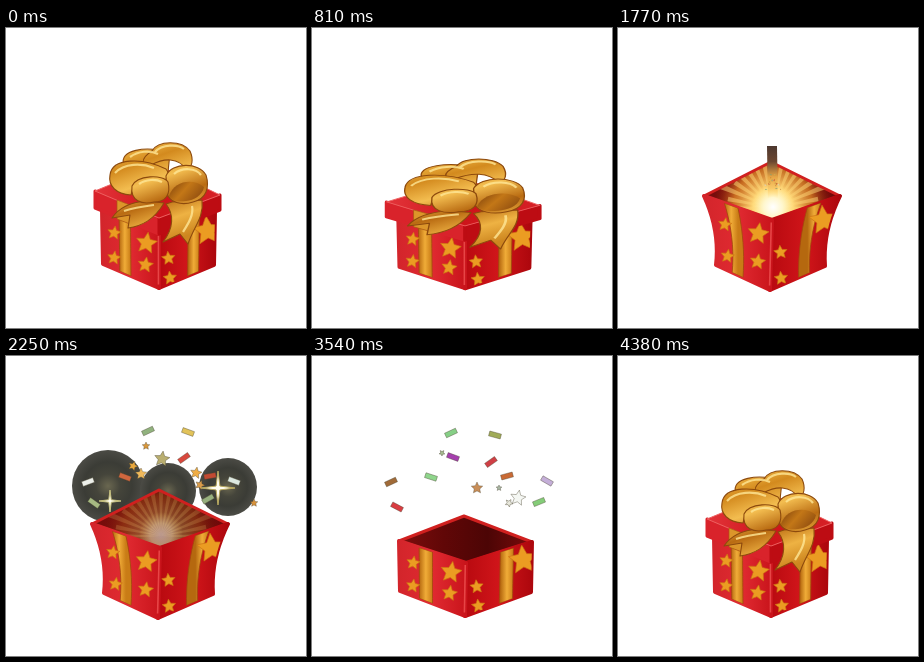
Recreate the animation shown at these times as an HTML page with a canvas. Size 300 by 300 pixels, loop 4470 ms.

```html
<!DOCTYPE html>
<html>
<head>
<meta charset="utf-8">
<style>
html, body { margin: 0; width: 100%; height: 100%; overflow: hidden; background: #fff; }
canvas { display: block; width: 300px; height: 300px; }
</style>
</head>
<body>
<canvas id="stage" width="300" height="300"></canvas>
<script>
const c = document.getElementById('stage').getContext('2d');
const LOOP = 4470, STEP = 30, LAST = 4380;
const BASE = [153, 262], LIGHT = [155, 180];

// Corners: rim left, back, right, front; then bottom left, front, right
const CLOSED = [[96, 181], [152, 150], [209, 184], [153, 206], [97, 236], [153, 260], [208, 237]];
const OPEN = [[86, 168], [153, 134], [222, 168], [154, 192], [98, 237], [152, 262], [207, 238]];
const EMPTY = [[87, 185], [152, 160], [220, 186], [154, 207], [88, 235], [153, 260], [219, 236]];

// Face decoration: side (0 left, 1 right), u, v, radius
const STARS = [[0, .21, .34, 7], [0, .78, .27, 11], [0, .2, .8, 7], [0, .76, .68, 8], [1, .17, .52, 7], [1, .2, .9, 7], [1, .87, .3, 15]];

// Confetti: x, y, angle, colour, kind (undefined = strip)
const BRIGHT = [
  [142, 75, -25, '#91b27e'], [182, 76, 20, '#e2c35a'], [82, 126, -20, '#edf0ea'], [178, 102, -35, '#d8483e'],
  [119, 121, 20, '#cf663e'], [88, 147, 35, '#a6b982'], [228, 125, 20, '#dce8e0'], [204, 120, -10, '#c24a32'],
  [202, 143, -30, '#97b07e'], [140, 90, 0, '#d9973a', 4], [156, 103, 8, '#b9ae70', 8], [127, 110, 20, '#e8a83f', 5],
  [135, 118, 0, '#f0b95b', 6], [190, 117, 10, '#efad45', 6], [248, 147, 0, '#d9923a', 4], [194, 129, 20, '#d99b4a', 5]
];
const SOFT = [
  [139, 77, -25, '#86cf86'], [183, 79, 15, '#a0ab58'], [141, 101, 20, '#a53fae'], [179, 106, -35, '#cf3f45'],
  [119, 121, 18, '#8fd58c'], [79, 126, -25, '#a06a38'], [85, 151, 28, '#d93d42'], [227, 146, -22, '#84cc78'],
  [235, 125, 30, '#c4aed8'], [195, 120, -15, '#c96a35'], [130, 97, -35, '#a6bd90', 3], [187, 132, 0, '#a9b7a4', 3],
  [165, 132, 0, '#c98e58', 6], [206, 142, 10, '#f5f7f3', 8], [197, 147, 30, '#e8e8dc', 4]
];
const DIM = [
  [175, 113, 25, '#4d4452'], [231, 141, 30, '#dda04e'], [226, 164, -20, '#dd3340'], [193, 131, -20, '#b5a878'],
  [87, 152, -20, '#a88768'], [172, 131, -40, '#34323a'], [208, 136, -30, '#494044']
];
// start, time until the listed places, gravity, pieces
const BURSTS = [[1170, 400, 2.6, SOFT], [1740, 510, 2.6, BRIGHT], [2300, 580, 6.2, DIM], [2850, 690, 2.6, SOFT]];

const BOW = [
  'M166 174L196 172C198 190 188 198 182 216L174 206L157 214C168 200 168 186 160 176Z',
  'M140 173C128 174 114 178 106 190L124 187L122 200C136 198 148 192 158 175Z',
  'M118 137C112 122 140 117 164 125L162 144C142 134 130 139 118 137Z',
  'M146 123C152 112 176 112 184 123C188 132 186 139 181 142C172 129 158 130 145 137C136 140 133 131 146 123Z',
  'M104 147C106 130 136 129 160 141C165 147 160 153 156 153C140 147 127 153 125 167C110 166 102 158 104 147Z',
  'M160 148C166 134 193 134 200 147C204 160 200 171 187 174C175 178 164 174 161 166Z',
  'M126 158C131 147 157 146 162 154C165 166 160 174 148 174C136 177 124 173 126 158Z'
].map(d => new Path2D(d));
const BOW_SHADE = new Path2D('M163 168C168 152 188 150 198 159C196 168 188 172 180 173C172 174 166 173 163 168Z');
const BOW_SHINE = new Path2D('M109 145C118 135 136 135 148 140M133 156C140 151 150 151 156 154M149 124C156 116 172 116 178 121M168 146C176 139 190 140 195 147M124 129C132 123 144 122 152 126M186 178C188 187 182 196 177 204M118 183C130 179 140 178 148 177');

const clamp = x => Math.max(0, Math.min(1, x));
const lerp = (a, b, k) => a + (b - a) * k;
const mix = (a, b, k) => [lerp(a[0], b[0], k), lerp(a[1], b[1], k)];
const mixPose = (a, b, k) => a.map((p, i) => mix(p, b[i], k));

function key(t, frames) {
  if (t <= frames[0][0]) return frames[0][1];
  for (let i = 1; i < frames.length; i++) {
    const [t0, a] = frames[i - 1], [t1, b] = frames[i];
    if (t <= t1) {
      const k = (t - t0) / (t1 - t0);
      return lerp(a, b, k * k * (3 - 2 * k));
    }
  }
  return frames[frames.length - 1][1];
}

function trace(points) {
  c.beginPath();
  points.forEach(p => c.lineTo(p[0], p[1]));
  c.closePath();
}

function paint(fill, stroke, width = 1) {
  c.fillStyle = fill;
  c.fill();
  if (stroke) {
    c.strokeStyle = stroke;
    c.lineWidth = width;
    c.stroke();
  }
}

function linear(x0, y0, x1, y1, colors) {
  const g = c.createLinearGradient(x0, y0, x1, y1);
  colors.forEach((col, i) => g.addColorStop(i / (colors.length - 1), col));
  return g;
}

function radial(x, y, r, colors) {
  const g = c.createRadialGradient(x, y, 0, x, y, r);
  colors.forEach((col, i) => g.addColorStop(i / (colors.length - 1), col));
  return g;
}

function star(x, y, r, angle, tips = 5, inner = .48) {
  const points = [];
  for (let i = 0; i < tips * 2; i++) {
    const a = angle - Math.PI / 2 + i * Math.PI / tips, d = i % 2 ? r * inner : r;
    points.push([x + d * Math.cos(a), y + d * Math.sin(a)]);
  }
  trace(points);
}

function face(pose, side, flare) {
  const rim = side ? [pose[3], pose[2]] : [pose[0], pose[3]];
  const low = side ? [pose[5], pose[6]] : [pose[4], pose[5]];
  const at = (u, v) => {
    const p = mix(mix(...rim, u), mix(...low, u), v);
    const outer = side ? -u : 1 - u;
    return [p[0] + outer * flare * 20 * v * (1 - v), p[1]];
  };
  const strip = (u0, u1) => {
    const down = [], up = [];
    for (let v = 0; v <= 1.01; v += .1) {
      down.push(at(u0, v));
      up.unshift(at(u1, v));
    }
    trace(down.concat(up));
  };
  const red = side
    ? linear(rim[0][0], 0, rim[1][0], 0, ['#b90a10', '#d0151a', '#ad070d'])
    : linear(rim[0][0], 0, rim[1][0], 0, ['#d3252b', '#e02a31', '#c9141b']);
  strip(0, 1);
  paint(red, red, 4);
  c.save();
  c.clip();
  const [u0, u1] = side ? [.52, .72] : [.3, .5];
  strip(u0, u1);
  paint(linear(at(u0, 0)[0], 0, at(u1, 0)[0], 0, ['#b5680f', '#f0ac38', '#c97c16']), '#a1480d', .8);
  STARS.filter(s => s[0] === side).forEach(([, u, v, r]) => {
    const [x, y] = at(u, v);
    star(x, y, r, side ? -.1 : .15);
    paint('#eb9c22', '#cf7414', .7);
  });
  c.restore();
  if (!side) {
    c.beginPath();
    for (let v = .04; v < .96; v += .1) c.lineTo(...at(.99, v));
    c.strokeStyle = 'rgba(255,110,105,.55)';
    c.lineWidth = 1.6;
    c.stroke();
  }
}

function lid() {
  const L = [89, 163], B = [152, 137], R = [214, 167], F = [153, 190];
  const low = (p, d) => [p[0], p[1] + d];
  trace([L, F, low(F, 16), low(L, 17)]);
  paint('#d9232b', '#d9232b', 3);
  trace([F, R, low(R, 15), low(F, 16)]);
  paint('#bd0c13', '#bd0c13', 3);
  trace([L, B, R, F]);
  paint(linear(89, 0, 214, 0, ['#e3343a', '#cd141a', '#d62026']), '#ee6060', 1);
  trace([[111, 172], [124, 177], [124, 196], [111, 191]]);
  paint('#dc962a', '#a95b11', .7);
  trace([[181, 180], [193, 175], [193, 192], [181, 197]]);
  paint('#d08a20', '#a95b11', .7);
  const gold = linear(125, 115, 160, 215, ['#f4bd4c', '#d38a1e', '#f3bd50', '#b96b12', '#eeb243', '#cd861f']);
  BOW.forEach((path, i) => {
    c.fillStyle = gold;
    c.fill(path);
    c.strokeStyle = '#8d4a0d';
    c.lineWidth = 1.1;
    c.stroke(path);
    if (i === 5) {
      c.fillStyle = linear(165, 152, 190, 174, ['#7d400b', '#c37717', '#935010']);
      c.fill(BOW_SHADE);
    }
  });
  c.strokeStyle = 'rgba(255,232,150,.8)';
  c.lineWidth = 2.2;
  c.stroke(BOW_SHINE);
}

function interior(pose, glow) {
  const [L, B, R, F] = pose;
  trace([L, B, R, F]);
  paint(linear(L[0], 0, R[0], 0, ['#7d0e0d', '#610707', '#4c0505', '#7a0b0b']));
  c.save();
  c.clip();
  c.globalAlpha = glow;
  const [x, y] = LIGHT;
  c.fillStyle = radial(x, y, 60, ['#fffbe0', '#ffd877', 'rgba(232,140,40,.75)', 'rgba(170,40,15,0)']);
  c.fillRect(60, 100, 190, 110);
  for (let i = 0; i < 17; i++) {
    const a = Math.PI * (1 + i / 16), d = i % 2 ? 46 : 60;
    trace([[x, y], [x + d * Math.cos(a - .05), y + d * Math.sin(a - .05)], [x + d * Math.cos(a + .05), y + d * Math.sin(a + .05)]]);
    paint('rgba(255,216,120,.5)');
  }
  c.fillStyle = radial(x, y - 2, 22, ['#fff', '#fff6c4', 'rgba(255,225,130,0)']);
  c.fillRect(120, 150, 70, 50);
  c.restore();
  trace([L, B, R, F]);
  c.strokeStyle = '#d0201f';
  c.lineWidth = 3;
  c.stroke();
}

function beam(x, y, width, alpha) {
  if (alpha <= 0) return;
  c.globalAlpha = alpha;
  c.strokeStyle = linear(...LIGHT, x, y, ['#fff2b0', '#ffd574', '#e7a545', '#6b4630', '#4d382f']);
  c.lineWidth = width;
  c.beginPath();
  c.moveTo(...LIGHT);
  c.lineTo(x, y);
  c.stroke();
  c.globalAlpha = 1;
}

function halos(power) {
  if (power <= 0) return;
  c.globalAlpha = power;
  [[102, 130, 36], [222, 131, 29], [162, 135, 28]].forEach(([x, y, r]) => {
    c.beginPath();
    c.arc(x, y, r * power, 0, 7);
    paint(radial(x, y, r, ['#6a6750', '#45453b', '#3b3c36', '#4b4b45']));
  });
  c.globalAlpha = 1;
}

function sparkle(x, y, r, tint) {
  if (r <= 0) return;
  star(x, y, r, 0, 4, .16);
  paint('#fffdf0', tint, 1);
}

function burst(t, [start, span, pull, pieces]) {
  const k = (t - start) / span;
  if (k <= 0 || k >= 1 + 1 / pull) return;
  const size = Math.min(1, k * 2.5);
  pieces.forEach(([x, y, angle, color, r], i) => {
    c.save();
    c.translate(154 + (x - 154) * k * (1.6 - .6 * k), 165 + (y - 165) * k * (1 + pull - pull * k));
    c.rotate(angle * Math.PI / 180 + (k - 1) * (i % 2 ? 4 : -4));
    c.scale(size, size);
    if (r) star(0, 0, r, 0);
    else {
      c.beginPath();
      c.rect(-6, -2.5, 12, 5);
    }
    paint(color, 'rgba(70,65,45,.45)', .8);
    c.restore();
  });
}

function draw(t) {
  c.clearRect(0, 0, 300, 300);
  c.lineJoin = 'round';
  const squash = key(t, [[0, 0], [240, .7], [450, -.3], [570, 0], [810, 1], [1020, -.7], [1140, .3], [1200, 0],
    [3780, 1], [3960, -.7], [4110, .6], [4250, -.3], [4330, .25], [4380, 0]]);
  const sx = 1 + .17 * squash, sy = 1 - .11 * squash;
  const fit = ([x, y]) => [BASE[0] + (x - BASE[0]) * sx, BASE[1] + (y - BASE[1]) * sy];
  const back = t >= 3780;
  const open = back ? 0 : key(t, [[1140, 0], [1260, 1]]);
  const fall = back ? 0 : key(t, [[3270, 0], [3510, 1]]);
  const pose = mixPose(mixPose(CLOSED.map(fit), OPEN, open), EMPTY, fall);
  const flare = open * (1 - fall);
  const glow = key(t, [[1140, 0], [1260, 1], [1800, 1], [2220, .35], [2340, .35], [2700, .9], [2880, 1], [3200, .8], [3420, 0]]);

  halos(key(t, [[2040, 0], [2220, 1], [2270, 1], [2400, 0]]));
  if (t > 1140 && !back) {
    const narrow = key(t, [[1710, 0], [1770, 1], [1800, 1], [1890, 0]]);
    const wide = key(t, [[2790, 0], [2880, 1], [2910, 1], [3060, 0]]);
    beam(98, 135, 12, wide);
    beam(212, 134, 12, wide);
    interior(pose, glow);
    beam(154, 118, 10, narrow);
    beam(153, 104, 13, wide);
    if (wide > 0) {
      c.globalAlpha = wide;
      trace([[139, 108], [158, 101], [161, 112], [146, 113]]);
      paint('#60432f');
      c.globalAlpha = 1;
    }
    if (narrow + wide > 0) {
      c.globalAlpha = narrow + wide;
      c.fillStyle = radial(155, 179, 19, ['#fff', '#fff7ce', 'rgba(255,225,130,0)']);
      c.fillRect(135, 159, 40, 40);
      c.globalAlpha = 1;
    }
    BURSTS.forEach(b => burst(t, b));
  }
  face(pose, 1, flare);
  face(pose, 0, flare);

  if (t < 1320 || back) {
    const pop = back ? 0 : key(t, [[1110, 0], [1320, 1]]);
    const drop = back ? key(t, [[3780, 1], [3960, 0]]) : 0;
    const wide = 1 + .225 * squash;
    c.save();
    c.globalAlpha = clamp(1 - pop) * clamp(1.2 - drop);
    c.translate(BASE[0], BASE[1] - 50 * pop - 30 * drop);
    c.scale(wide, sy);
    c.translate(-BASE[0], -BASE[1]);
    lid();
    c.restore();
  }

  const flash = key(t, [[2100, 0], [2220, 1], [2280, 1], [2400, 0]]);
  sparkle(104, 145, 11 * flash, '#c5bf7c');
  sparkle(212, 132, 17 * flash, '#b8a85d');
  const shine = key(t, [[2700, 0], [2880, 1], [3120, 0]]);
  sparkle(84, 161, 20 * shine, '#ddd2a0');
  sparkle(195, 209, 18 * shine, '#f5d98a');
}

function tick(now) {
  const t = Math.floor(now % LOOP / STEP) * STEP;
  draw(Math.min(t, LAST));
  requestAnimationFrame(tick);
}
requestAnimationFrame(tick);
</script>
</body>
</html>
```
